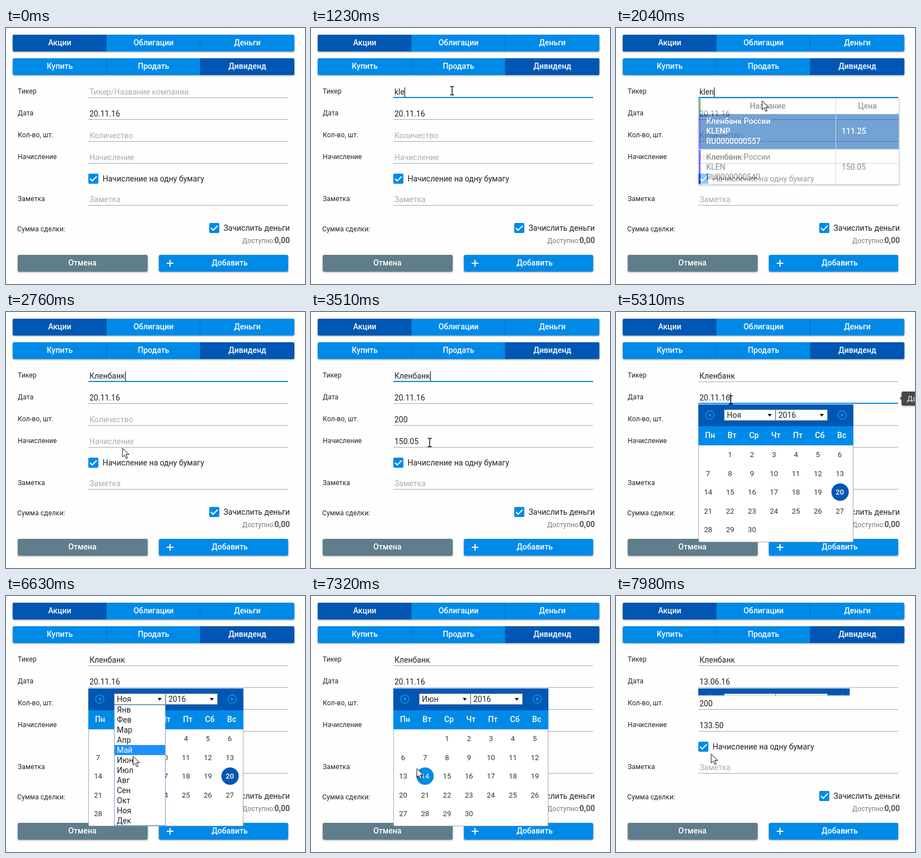
Recreate the animation shown at these times as an HTML page. Size 534x457 px, loop 8 s.

```html
<!DOCTYPE html>
<html lang="ru">
<head>
<meta charset="utf-8">
<title>Дивиденд</title>
<style>
html, body { margin: 0; width: 100%; height: 100%; overflow: hidden; background: #fefefe; }
svg { display: block; width: 534px; height: 457px; font: 14px Roboto, Arial, sans-serif; }
text { fill: #222; white-space: pre; }
.label { font-size: 12px; letter-spacing: .15px; }
.white { fill: #fff; }
.mid { text-anchor: middle; }
.strong { font-weight: 500; }
.day { font-size: 13px; text-anchor: middle; fill: #333; }
.raised { filter: drop-shadow(0 1px 1.5px rgba(0, 0, 0, .4)); }
.row text { fill: #333; }
.row .bg { fill: #fff; }
.row.on text { fill: #fff; font-weight: 500; }
.row.on .bg { fill: #0057b3; }
.month .bg { fill: none; }
.month.on .bg { fill: #1e90ff; }
.month.on text { fill: #fff; }
</style>
</head>
<body>
<svg id="stage" viewBox="0 0 534 457"></svg>
<script>
const LOOP = 8000;
const BLUE = '#008ae8', NAVY = '#0057b3', LINE = '#a8a8a8';
const COMPANY = 'Кленбанк', TYPED = 'klen';
const MONTHS = ['Янв', 'Фев', 'Мар', 'Апр', 'Май', 'Июн', 'Июл', 'Авг', 'Сен', 'Окт', 'Ноя', 'Дек'];
const WEEK = ['Пн', 'Вт', 'Ср', 'Чт', 'Пт', 'Сб', 'Вс'];
const NOV = 10, JUN = 5;

// When things happen, in ms
const AT = {
  focus: 570, type: 810, keyGap: 210, suggest: 1830, pick: 2640, fill: 2940,
  date: 4920, list: 6000, month: 6960, day: 7810
};

const FIELDS = {
  ticker: { y: 124, label: 'Тикер', hint: 'Тикер/Название компании' },
  date: { y: 163, label: 'Дата', hint: '' },
  count: { y: 202, label: 'Кол-во, шт.', hint: 'Количество' },
  income: { y: 241, label: 'Начисление', hint: 'Начисление' },
  note: { y: 316, label: 'Заметка', hint: 'Заметка' }
};

// time, x, y, pointer shape until the next stop
const PATH = [
  [30, 470, 26, 'hand'], [240, 336, 94, 'hand'], [330, 318, 98, 'arrow'], [500, 252, 112, 'beam'],
  [1740, 252, 112, 'arrow'], [2040, 261, 130, 'arrow'], [2460, 212, 262, 'arrow'],
  [2640, 210, 262, 'arrow'], [2760, 208, 243, 'arrow'], [2820, 207, 236, 'beam'],
  [3120, 196, 194, 'beam'], [3360, 200, 196, 'beam'], [3510, 212, 233, 'beam'],
  [3660, 206, 243, 'arrow'], [3820, 195, 258, 'arrow'], [4020, 184, 243, 'beam'],
  [4230, 190, 200, 'beam'], [4450, 205, 157, 'beam'], [5700, 205, 157, 'beam'],
  [5760, 212, 165, 'arrow'], [6000, 240, 184, 'arrow'], [6200, 240, 186, 'arrow'],
  [6510, 226, 236, 'arrow'], [6630, 227, 286, 'arrow'], [6780, 228, 292, 'arrow'],
  [6960, 228, 292, 'arrow'], [7530, 166, 318, 'arrow'], [7800, 166, 318, 'arrow'],
  [LOOP, 170, 278, 'arrow']
];

// field, from, to
const TIPS = [['count', 3090, 3400], ['income', 3570, 3840], ['count', 4120, 4320], ['date', 4440, 5680]];

const rect = (x, y, w, h, fill, extra = '') =>
  `<rect x="${x}" y="${y}" width="${w}" height="${h}" fill="${fill}" ${extra}/>`;
const text = (x, y, s, cls = '', extra = '') => `<text x="${x}" y="${y}" class="${cls}" ${extra}>${s}</text>`;
const path = (d, extra) => `<path d="${d}" ${extra}/>`;
const group = (id, body, extra = '') => `<g id="${id}" ${extra}>${body}</g>`;

function tabs(y, names, active) {
  const edges = [12, 180, 347, 515];
  const x = edges[active], w = edges[active + 1] - x;
  const inner = active ? x : x + w - 6;
  return `<g class="raised">${rect(12, y, 503, 30, BLUE, 'rx="3"')}${rect(x, y, w, 30, NAVY, 'rx="3"')}` +
    `${rect(inner, y, 6, 30, NAVY)}</g>` +
    [179, 346].map(e => rect(e, y, 1, 30, '#0070c8')).join('') +
    names.map((s, i) => text((edges[i] + edges[i + 1]) / 2, y + 19, s, 'white mid strong')).join('');
}

function field(name) {
  const { y, label } = FIELDS[name];
  return text(21, y - 7, label, 'label') +
    rect(147, y, 357, 1, LINE, `id="${name}Line"`) + text(149, y - 5, '', '', `id="${name}Text"`);
}

const checkbox = (x, y, s) => rect(x, y, 18, 18, BLUE, 'rx="2"') +
  path(`M${x + 3} ${y + 9}l4 4 8-8`, 'fill="none" stroke="#fff" stroke-width="2"') +
  text(x + 25.5, y + 13.5, s);

const button = (x, w, color, s, mid) =>
  rect(x, 405, w, 30, color, 'rx="3" class="raised"') + text(mid, 424, s, 'white mid strong');

function suggestion(id, y, lines, price) {
  return group(id, rect(147, y, 359, 63, '', 'class="bg"') + rect(147, y, 4, 63, '#00f') +
    lines.map((s, i) => text(161, y + 18 + i * 18, s)).join('') +
    text(403, y + 36, price), 'class="row"');
}

const suggestions = () => group('suggest',
  rect(147, 125, 359, 155, '#fff', 'class="raised"') + rect(147, 125, 4, 28, 'green') +
  text(271, 144, 'Название', 'mid strong', 'style="fill:#444"') +
  text(449, 144, 'Цена', 'mid strong', 'style="fill:#444"') +
  suggestion('row0', 153, [COMPANY + ' России', 'KLENP', 'RU0000000557'], '111.25') +
  suggestion('row1', 217, [COMPANY + ' России', 'KLEN', 'RU0000000540'], '150.05') +
  rect(392, 125, 1, 155, '#bbb') + rect(151, 153, 355, 1, '#bbb') + rect(151, 216, 355, 1, '#bbb') +
  rect(147.5, 125.5, 358, 154, 'none', 'stroke="#aaa"'));

const dayX = col => 164.5 + col * 39.2;
const dayY = row => 254.5 + row * 33.5;

function days(id, offset) {
  let out = '';
  for (let n = 1; n <= 30; n++) {
    const cell = n - 1 + offset, x = dayX(cell % 7), y = dayY(Math.floor(cell / 7));
    const chosen = id === 'nov' && n === 20;
    if (chosen) out += `<circle cx="${x + .5}" cy="${y}" r="15.5" fill="${NAVY}"/>`;
    out += text(x, y + 4.5, n, 'day', chosen ? 'style="fill:#fff;font-weight:500"' : '');
  }
  return group(id, out);
}

const select = (x, w, id, s) => rect(x + .5, 174.5, w - 1, 19, '#fff', 'stroke="#8f9aa8"') +
  text(x + 5, 189, s, '', `id="${id}"`) + path(`M${x + w - 14} 182h7l-3.5 5z`, 'fill="#111"');

const arrowButton = (x, dir) =>
  `<circle cx="${x}" cy="184" r="7.5" fill="none" stroke="#1493f0" stroke-width="1.5"/>` +
  path(`M${x + 3 * dir} 184l${-5 * dir}-3.5v7z`, 'fill="#1493f0"');

const calendar = () =>
  `<clipPath id="calClip">${rect(147, 165, 277, 246, '#000', 'id="calWindow"')}</clipPath>` +
  group('calendar',
    rect(147.5, 165.5, 276, 245, '#fff', `rx="2" stroke="${LINE}"`) +
    rect(147, 165, 277, 39, NAVY) + rect(147, 204, 277, 34, BLUE) +
    arrowButton(167.5, -1) + arrowButton(404, 1) +
    select(193, 92, 'monthName', 'Ноя') + select(285, 93, 'yearName', '2016') +
    WEEK.map((s, i) => text(168 + i * 39.2, 225, s, 'white mid strong')).join('') +
    days('nov', 1) + days('jun', 2) +
    group('hover', `<circle r="15.5" fill="${BLUE}"/>` + text(0, 4.5, '', 'day', 'id="hoverDay" style="fill:#fff"')),
    'clip-path="url(#calClip)"');

const monthList = () => group('months',
  rect(193.5, 194.5, 91, 215, '#fff', 'stroke="#6f9bd0"') +
  MONTHS.map((s, i) => `<g class="month">${rect(194, 194 + i * 18, 90, 18, '', 'class="bg"')}` +
    `${text(198, 208 + i * 18, s)}</g>`).join(''));

const pointers = () =>
  group('arrow', path('M0 0v16l3.7-3.5 2.8 6.3 2.6-1.1-2.8-6.2h5.2z', 'fill="#fff" stroke="#111"')) +
  group('beam', path('M-3.5-7.5h2.5l1 1 1-1h2.5M-3.5 7.5h2.5l1-1 1 1h2.5M0-6.5v13', 'fill="none" stroke="#111" stroke-width="1.4"')) +
  group('hand', path('M0 1q1.5-2 3 0v6l8 1.5q2 .5 2 3l-1.5 7h-8l-5.500-6.500q-1-2.500 2-1.500z', 'fill="#fff" stroke="#111"'));

document.getElementById('stage').innerHTML =
  tabs(12, ['Акции', 'Облигации', 'Деньги'], 0) + tabs(54, ['Купить', 'Продать', 'Дивиденд'], 2) +
  Object.keys(FIELDS).map(field).join('') + rect(0, 0, 1, 17, '#000', 'id="caret"') +
  checkbox(147, 260, 'Начисление на одну бумагу') + checkbox(363, 348, 'Зачислить деньги') +
  text(20, 363, 'Сумма сделки:', 'label') +
  text(422, 384, 'Доступно:', 'label', 'style="fill:#777"') +
  text(507, 384, '0,00', '', 'text-anchor="end" style="fill:#555;font-weight:700"') +
  button(21, 232, '#607d8b', 'Отмена', 136.5) + button(273, 231, BLUE, 'Добавить', 399.5) +
  path('M287 420h12M293 414v12', 'stroke="#fff" stroke-width="2"') +
  suggestions() + calendar() + monthList() +
  group('tip', path('M507 0l4-4v8z', 'fill="#484848"') + rect(510, -12, 60, 25, '#484848', 'rx="3"') +
    text(520, 4.5, '', 'white', 'id="tipText" style="font-size:13px"'), 'class="raised"') +
  pointers();

const el = {};
document.querySelectorAll('[id]').forEach(e => el[e.id] = e);
const monthRows = [...document.querySelectorAll('.month')];

const clamp = v => Math.min(1, Math.max(0, v));
const swing = p => .5 - Math.cos(clamp(p) * Math.PI) / 2;
const show = (e, on) => e.style.display = on ? '' : 'none';
const place = (e, x, y) => e.setAttribute('transform', `translate(${x} ${y})`);

function pointerAt(t) {
  const i = PATH.findLastIndex(k => k[0] <= t);
  if (i < 0) return { x: -50, y: -50, kind: 'arrow' };
  const [t0, x0, y0, kind] = PATH[i], [t1, x1, y1] = PATH[i + 1] || PATH[i];
  const p = t1 > t0 ? (t - t0) / (t1 - t0) : 0;
  return { x: x0 + (x1 - x0) * p, y: y0 + (y1 - y0) * p, kind };
}

function valuesAt(t) {
  const keys = t < AT.type ? 0 : Math.floor((t - AT.type) / AT.keyGap) + 1;
  return {
    ticker: t < AT.pick ? TYPED.slice(0, keys) : COMPANY,
    date: t < AT.day ? '20.11.16' : '13.06.16',
    count: t < AT.fill ? '' : '200',
    income: t < AT.fill ? '' : t < AT.day ? '150.05' : '133.50',
    note: ''
  };
}

function drawFields(t) {
  const values = valuesAt(t);
  const focus = t < AT.focus ? '' : t < AT.date ? 'ticker' : t < AT.list ? 'date' : '';
  for (const name in FIELDS) {
    const line = el[name + 'Line'], label = el[name + 'Text'], on = name === focus;
    label.textContent = values[name] || FIELDS[name].hint;
    label.style.fill = values[name] ? '#222' : '#adadad';
    line.setAttribute('fill', on ? BLUE : LINE);
    line.setAttribute('y', FIELDS[name].y - (on ? 1 : 0));
    line.setAttribute('height', on ? 2 : 1);
    if (on) {
      const width = values[name] ? label.getComputedTextLength() : 0;
      place(el.caret, Math.round(149 + width), FIELDS[name].y - 18);
    }
  }
  show(el.caret, focus);
}

function drawCalendar(t, pointer) {
  const open = swing((t - AT.date) / 200) - swing((t - AT.day) / 200);
  const june = t >= AT.month;
  show(el.calendar, open > 0);
  el.calWindow.setAttribute('height', 246 * open);
  el.calWindow.setAttribute('width', 270 + 7 * open);
  el.monthName.textContent = MONTHS[june ? JUN : NOV];
  show(el.nov, !june);
  show(el.jun, june);

  const col = Math.round((pointer.x - dayX(0)) / 39.2), row = Math.round((pointer.y - dayY(0)) / 33.5);
  const day = row * 7 + col - 1;
  show(el.hover, june && day > 0 && day <= 30);
  place(el.hover, dayX(col), dayY(row));
  el.hoverDay.textContent = day;

  show(el.months, t >= AT.list + 30 && !june);
  const lagY = pointerAt(t - 30).y;
  const hot = lagY < 195 ? NOV : Math.floor((lagY - 194) / 18);
  monthRows.forEach((r, i) => r.classList.toggle('on', i === hot));
}

function drawTip(t) {
  const tip = TIPS.find(([, from, to]) => t >= from && t < to);
  show(el.tip, tip);
  if (!tip) return;
  const [name, from, to] = tip;
  place(el.tip, 0, FIELDS[name].y - 9);
  el.tipText.textContent = FIELDS[name].label;
  el.tip.style.opacity = Math.min(clamp((t - from) / 150), clamp((to - t) / 100));
}

function draw(t) {
  const pointer = pointerAt(t);
  drawFields(t);
  show(el.suggest, t >= AT.suggest && t < AT.pick);
  el.suggest.style.opacity = swing((t - AT.suggest) / 400);
  const second = pointer.y >= 217;
  el.row0.classList.toggle('on', !second);
  el.row1.classList.toggle('on', second);
  drawCalendar(t, pointer);
  drawTip(t);
  for (const kind of ['arrow', 'beam', 'hand']) show(el[kind], kind === pointer.kind);
  place(el[pointer.kind], Math.round(pointer.x), Math.round(pointer.y));
}

const start = performance.now();
function tick() {
  draw((performance.now() - start) % LOOP);
  requestAnimationFrame(tick);
}
tick();
</script>
</body>
</html>
```
